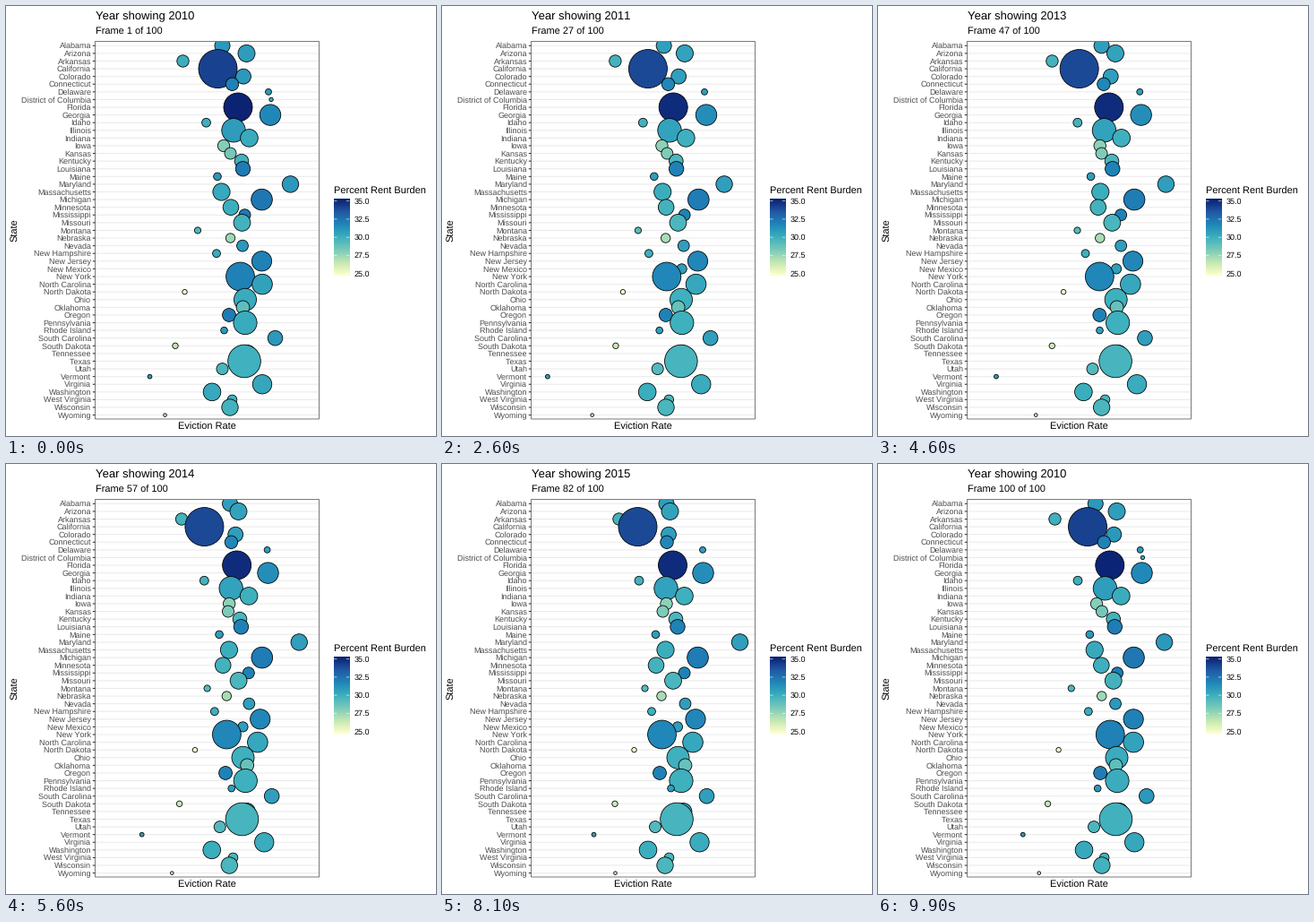
Write a matplotlib script that moves like this. It is 480x480 px and loops after 10000 ms.

```python
import numpy as np
import matplotlib.pyplot as plt
from matplotlib.animation import FuncAnimation
from matplotlib.colors import LinearSegmentedColormap, Normalize
from matplotlib.patches import Circle, Rectangle

SIZE, DPI = 480, 80
PX = 72 / DPI
FRAMES, YEARS = 100, 7
LEFT, TOP, RIGHT, BOTTOM = 99.5, 39.5, 349.5, 461
ROW0, ROW_STEP = 44.3, 8.59

plt.rcParams.update({"font.family": "Liberation Sans", "path.snap": False,
                     "text.hinting": "none", "text.hinting_factor": 1})
cmap = LinearSegmentedColormap.from_list("burden", [
    "#ffffcc", "#c5e7b2", "#7acaba", "#3cafbe", "#1f86b8", "#2158a4", "#0a1f70"])
norm = Normalize(24.65, 35.35)

fig = plt.figure(figsize=(SIZE / DPI, SIZE / DPI), dpi=DPI, facecolor="white")
ax = fig.add_axes([0, 0, 1, 1])
ax.axis("off")


def label(x, y, s, size, color="black", **kw):
    kw.setdefault("va", "baseline")
    return ax.text(x, y, s, fontsize=size * PX, color=color, **kw)


def line(xs, ys, color, width, z):
    ax.plot(xs, ys, color=color, lw=width * PX, zorder=z, solid_capstyle="butt")


panel = Rectangle((LEFT, TOP), RIGHT - LEFT, BOTTOM - TOP, fc="none",
                  ec="#333333", lw=0.65 * PX, zorder=90)
ax.add_patch(panel)

bubbles = []


def state(name, x, r, burden, mid=0, late=0, gap=False):
    """Add a row; mid and late shift x by 2012 and 2015, gap hides those years."""
    i = len(bubbles)
    y = ROW0 + ROW_STEP * i
    line([LEFT, RIGHT], [y, y], "#ebebeb", 1.07, 1)
    line([LEFT - 2.7, LEFT], [y, y], "#333333", 1.07, 2)
    label(95, y + 3.1, name, 8.8, "#4d4d4d", ha="right")
    dot = Circle((x, y), r, ec="black", lw=0.8 * PX, zorder=10 + i)
    ax.add_patch(dot)
    dot.set_clip_path(panel)
    bubbles.append((dot, x, y, burden, mid, late, gap))


state("Alabama", 241.5, 8.5, 31, 7.5, 9)
state("Arizona", 268.5, 9.5, 30.8, 3, -14)
state("Arkansas", 197.5, 6.7, 30, -5)
state("California", 236.5, 21.5, 34.3, -8, -18)
state("Colorado", 265, 8.4, 31, -1, -12)
state("Connecticut", 252.5, 7.2, 32, 0, -1.5)
state("Delaware", 293, 3.4, 31, 0, -2)
state("District of Columbia", 296, 2.2, 30, -4, -4, gap=True)
state("Florida", 259, 16, 35.2, -1, -1.5)
state("Georgia", 295, 11.7, 31.7, 0, -3.5)
state("Idaho", 223.5, 4.9, 30, 1, -3.5)
state("Illinois", 254, 13.2, 30.8, 0, -4)
state("Indiana", 271.5, 9.8, 30.2, 1, -1)
state("Iowa", 243, 6.7, 28, 3, 7.5)
state("Kansas", 250.5, 6.5, 28.4, 1, -4)
state("Kentucky", 263, 7.8, 29.8, -2, -2)
state("Louisiana", 264.5, 8.2, 32.2, -3.5, -1.5)
state("Maine", 236, 4.3, 31, 1, 2.5)
state("Maryland", 317.5, 9.2, 31, -3, 15)
state("Massachusetts", 240.5, 9.6, 30.3, 7, 9)
state("Michigan", 285.5, 11.8, 32.4, 1)
state("Minnesota", 251, 8.8, 30, -1, -12)
state("Mississippi", 266.5, 6.5, 32.2, 5, 4)
state("Missouri", 263.5, 9.4, 29.8, 0, -5.5)
state("Montana", 214, 3.6, 29.5, 6, 12.5)
state("Nebraska", 250.5, 5.2, 27.4, -1, -5.5)
state("Nevada", 264, 6.4, 31, 7, 7.5)
state("New Hampshire", 235, 4.4, 30.2, -5, -1)
state("New Jersey", 285.5, 11.1, 32, 0, -2.5)
state("New Mexico", 266, 5.6, 31, 2, -3)
state("New York", 261.5, 15.9, 32, -13, -16)
state("North Carolina", 286, 11.3, 30.6, -3, -6)
state("North Dakota", 199.5, 2.7, 25, 3, 15)
state("Ohio", 267, 12.5, 30.2, 0, -3.5)
state("Oklahoma", 264.5, 7.4, 29, -1, 7)
state("Oregon", 249, 7.4, 32.2, 1, -6)
state("Pennsylvania", 267, 13.1, 30.2, 1)
state("Rhode Island", 243.5, 3.8, 31, -1, 12)
state("South Carolina", 300.5, 8.3, 31, -1, -5)
state("South Dakota", 189, 3.2, 26.5, 6, 4)
state("Tennessee", 269.5, 9.4, 30.5, -2)
state("Texas", 266, 18.3, 29.9, 1, -4)
state("Utah", 241.5, 6.5, 29.6, -1, -3.5)
state("Vermont", 160.5, 2.4, 31, -52, 9)
state("Virginia", 286, 10.7, 30.4, 4, 1.5)
state("Washington", 230, 9.8, 30.3, -1)
state("West Virginia", 252.5, 5.3, 29.8, 1, 1)
state("Wisconsin", 250, 9.2, 29.8, 0, -1)
state("Wyoming", 177.5, 1.8, 26.3, -12, 16)

# Titles
title = label(99.5, 15, "", 13.2)
subtitle = label(99.5, 32, "", 11)
label(224.5, 473, "Eviction Rate", 11, ha="center")
label(10, 250.5, "State", 11, ha="center", va="center", rotation=90)

# Colour bar
label(366, 209.4, "Percent Rent Burden", 11)
ax.imshow(np.linspace(1, 0, 256)[:, None], cmap=cmap, vmin=0, vmax=1,
          extent=(366, 383.3, 301, 215), aspect="auto", interpolation="bilinear")
for k in range(5):
    y = 217.8 + 20.15 * k
    for x in (366, 379.8):
        line([x, x + 3.5], [y, y], "white", 0.6, 5)
    label(389, y + 3.1, f"{35 - 2.5 * k:.1f}", 8.8)

ax.set_xlim(0, SIZE)
ax.set_ylim(SIZE, 0)


def update(k):
    # Each year holds for half its span, then moves on to the next.
    span = FRAMES / YEARS
    year, phase = divmod(k / span, 1)
    pos = year + max(0, 2 * phase - 1)
    shown = int((k + 1.5) / span) % YEARS
    title.set_text(f"Year showing {2010 + shown}")
    subtitle.set_text(f"Frame {k + 1} of {FRAMES}")

    drop = np.interp(pos, [0, 1, 6, 7], [0, 0.25, 0.25, 0])
    for dot, x, y, burden, mid, late, gap in bubbles:
        shift = np.interp(pos, [0, 2, 4.6, 6, 7], [0, mid, late, late, 0])
        dot.set_center((x + shift, y))
        dot.set_facecolor(cmap(norm(burden - drop)))
        dot.set_visible(not (gap and 1 < pos < 6))
    return []


anim = FuncAnimation(fig, update, frames=FRAMES, interval=100,
                     repeat=True, repeat_delay=0, blit=False)
plt.show()
```
